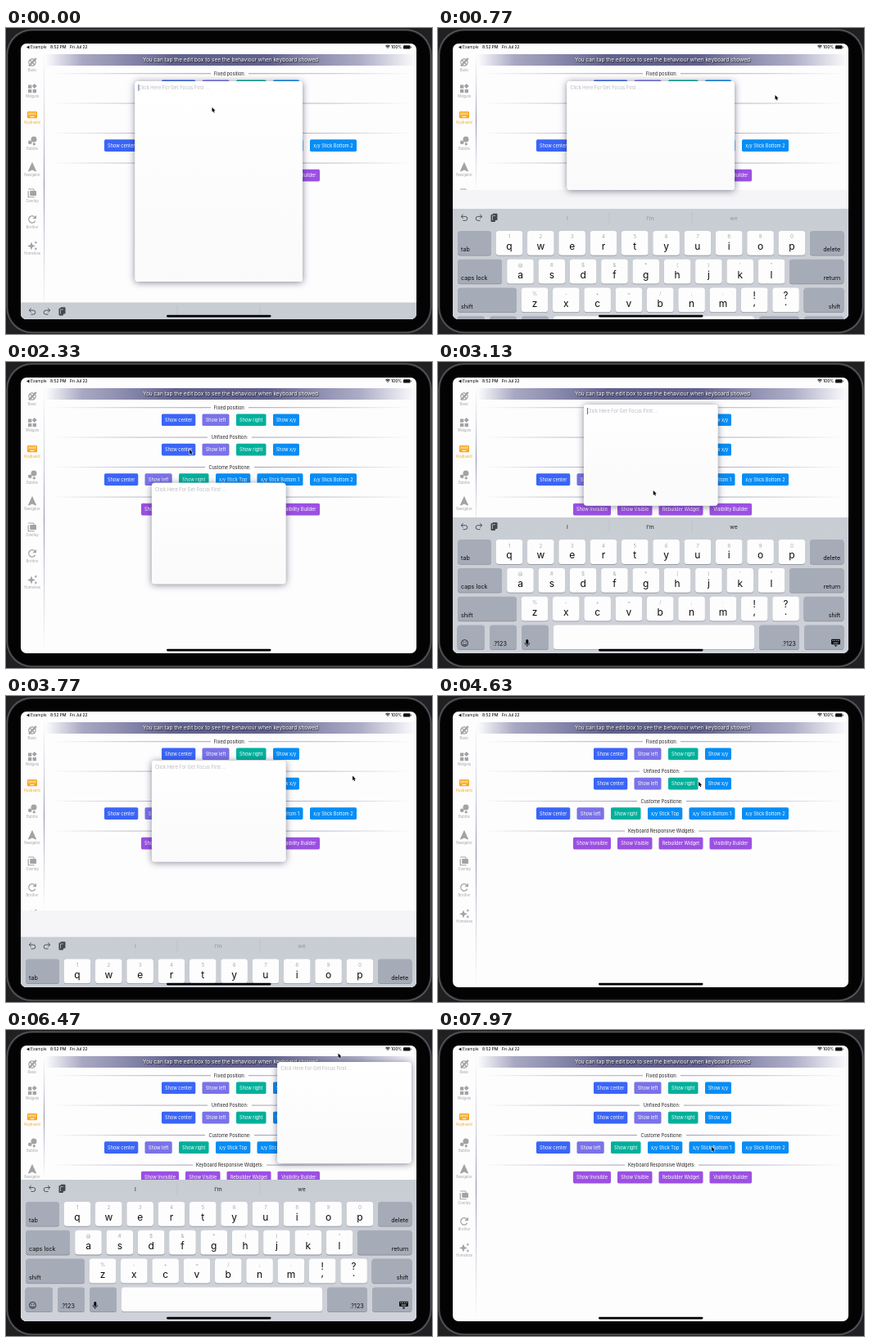
An HTML page with a canvas for the animation above (8 s loop, 520 px wide and 374 px high).

```html
<!DOCTYPE html>
<html lang="en">
<head>
<meta charset="utf-8">
<title>Keyboard popups</title>
<style>
html, body { margin: 0; width: 100%; height: 100%; overflow: hidden; background: #111; }
canvas { display: block; width: 520px; height: 374px; }
</style>
</head>
<body>
<canvas id="stage"></canvas>
<script>
const LOOP = 8000;
const SCREEN = { l: 18, t: 19, r: 501, b: 356 };
const KB_HEIGHT = 173, KB_TIME = 300, LAYOUT_LAG = 36;
const BLUE = '#3a65f6', VIOLET = '#7a72e8', TEAL = '#00b09b', SKY = '#078df5', PURPLE = '#9b50e2';

const canvas = document.getElementById('stage');
const ctx = canvas.getContext('2d');
const dpr = window.devicePixelRatio || 1;
canvas.width = 520 * dpr;
canvas.height = 374 * dpr;

const clamp = v => Math.max(0, Math.min(1, v));
const sine = p => (1 - Math.cos(Math.PI * clamp(p))) / 2;
const mix = (a, b, p) => a + (b - a) * p;

function box(l, t, r, b, radius, fill) {
  ctx.beginPath();
  ctx.roundRect(l, t, r - l, b - t, radius);
  ctx.fillStyle = fill;
  ctx.fill();
}

function text(str, x, y, size, color, align = 'center', weight = 400) {
  ctx.font = `${weight} ${size}px Inter, Roboto, sans-serif`;
  ctx.textAlign = align;
  ctx.textBaseline = 'alphabetic';
  ctx.fillStyle = color;
  ctx.fillText(str, x, y + size * 0.36);
}

function line(points, color, width = 1, close = false) {
  ctx.beginPath();
  points.forEach(([x, y]) => ctx.lineTo(x, y));
  if (close) ctx.closePath();
  ctx.strokeStyle = color;
  ctx.lineWidth = width;
  ctx.stroke();
}

function shape(points, color) {
  ctx.beginPath();
  points.forEach(([x, y]) => ctx.lineTo(x, y));
  ctx.fillStyle = color;
  ctx.fill();
}

function arc(x, y, r, from, to, color, width) {
  ctx.beginPath();
  ctx.arc(x, y, r, from, to);
  ctx.strokeStyle = color;
  ctx.lineWidth = width;
  ctx.stroke();
}

function dot(x, y, r, color) {
  ctx.beginPath();
  ctx.arc(x, y, r, 0, 7);
  ctx.fillStyle = color;
  ctx.fill();
}

function gradient(x0, y0, x1, y1, stops) {
  const g = ctx.createLinearGradient(x0, y0, x1, y1);
  stops.forEach(([at, color]) => g.addColorStop(at, color));
  return g;
}

function clipTo(l, t, r, b, radius, draw) {
  ctx.save();
  ctx.beginPath();
  ctx.roundRect(l, t, r - l, b - t, radius);
  ctx.clip();
  draw();
  ctx.restore();
}

// ---- timeline ----

const kbEvents = [[-66, 1], [678, 0], [2870, 1], [3593, 0], [5529, 1], [6560, 0]];

function keyboard(t) {
  const [start, open] = kbEvents.filter(e => e[0] <= t).pop() || [-66, 1];
  const age = t - start;
  const p = sine(age / KB_TIME);
  const lift = open ? p : 1 - p;
  const hints = open ? clamp((age - 80) / 110) : 1 - 0.7 * clamp(age / 80);
  return { top: SCREEN.b - KB_HEIGHT * lift, lift, open, age, hints };
}

const popups = [
  { from: -1000, to: 1250, cx: 259.7, w: 204.5, h: 245, fixed: true, dx: 0, dy: 300 },
  { from: 2168, to: 4180, cx: 259.7, w: 163.5, h: 123.5, dx: 0, dy: 230 },
  { from: 4950, to: 6990, cx: 413, w: 163.5, h: 123.5, dx: 190, dy: 0 }
];

// time, x, y of the pointer tip
const pointerPath = [
  [0, 251.5, 97], [150, 251.5, 97], [550, 411.5, 82], [1250, 411.5, 82],
  [1950, 224, 107], [2450, 224, 107], [2780, 255, 160], [3080, 255, 160],
  [3450, 423, 97.5], [4200, 423, 97.5], [4780, 299, 106], [5050, 299, 106],
  [5400, 397.5, 140], [5850, 397.5, 140], [6300, 405.5, 28.5], [7000, 405.5, 28.5],
  [7450, 416, 72], [7530, 416, 72], [7930, 334, 142.5], [LOOP, 334, 142.5]
];

function pointerAt(t) {
  const i = Math.max(1, pointerPath.findIndex(k => k[0] >= t));
  const [t0, x0, y0] = pointerPath[i - 1], [t1, x1, y1] = pointerPath[i];
  const p = sine((t - t0) / (t1 - t0));
  return [mix(x0, x1, p), mix(y0, y1, p)];
}

// ---- page ----

function drawDevice() {
  ctx.fillStyle = '#202022';
  ctx.fillRect(0, 0, 520, 374);
  box(0.5, 1.5, 519.5, 373, 31, '#55565b');
  box(2, 3, 518, 371.5, 30, '#1b1b1d');
  box(3, 4, 517, 370.5, 29, '#030303');
  box(SCREEN.l, SCREEN.t, SCREEN.r, SCREEN.b, 7, '#fdfdfe');
}

function drawStatus() {
  shape([[25, 23.5], [28.5, 21.5], [28.5, 25.5]], '#111');
  text('Example', 30, 23.5, 4.9, '#111', 'left');
  text('8:52 PM', 54, 23.5, 4.9, '#111', 'left', 500);
  text('Fri Jul 22', 78, 23.5, 4.9, '#111', 'left', 500);
  for (const r of [1.4, 2.8, 4.2]) arc(466, 25.3, r, -2.3, -0.84, '#111', 0.9);
  text('100%', 483.2, 23.5, 4.9, '#111', 'right', 500);
  box(485, 21.2, 493.5, 25.6, 1.2, '#111');
  box(494, 22.6, 494.8, 24.2, 0.4, '#111');
}

const icons = [
  ['Basic', c => {
    arc(0, 0, 4.2, 0, 7, c, 1.2);
    line([[-4, 4.5], [4.8, -5]], c, 2.4);
    line([[-3, -3], [3, 3]], c, 1.4);
  }],
  ['Widgets', c => {
    box(-5, -4.5, -0.7, -0.2, 0, c);
    box(-5, 1, -0.7, 5.3, 0, c);
    box(0.7, 1, 5, 5.3, 0, c);
    shape([[2.8, -6], [5.8, -3], [2.8, 0], [-0.2, -3]], c);
  }],
  ['Keyboard', c => {
    box(-6, -4, 6, 4.4, 1, c);
    for (let i = 0; i < 5; i++) {
      box(-4.7 + i * 2, -2.4, -3.5 + i * 2, -1.2, 0, '#fff');
      box(-4.7 + i * 2, -0.5, -3.5 + i * 2, 0.7, 0, '#fff');
    }
    box(-2.5, 2, 2.5, 3, 0, '#fff');
  }],
  ['Bubble', c => {
    dot(-2.7, 2, 2.4, c);
    dot(2, -1.8, 3.5, c);
    dot(2.3, 4, 1.6, c);
  }],
  ['Navigator', c => shape([[0, -6], [5, 5], [4.3, 5.6], [0, 3.7], [-4.3, 5.6], [-5, 5]], c)],
  ['Overlay', c => {
    line([[-4.8, -2.5], [-4.8, 5], [2.8, 5]], c, 1.2);
    line([[-4.8, -4.8], [2, -4.8], [2, -2.8]], c, 1);
    box(-2.8, -2.7, 5, 3.2, 0.8, c);
  }],
  ['Brother', c => {
    arc(0, 0.2, 4.2, 0.5, 5.5, c, 1.3);
    shape([[5, -5], [5, -0.4], [0.4, -0.4]], c);
  }],
  ['Homeless', c => {
    const spark = (x, y, r) => shape([[x, y - r], [x + r * .28, y - r * .28], [x + r, y], [x + r * .28, y + r * .28],
      [x, y + r], [x - r * .28, y + r * .28], [x - r, y], [x - r * .28, y - r * .28]], c);
    spark(-1, 0.8, 5);
    spark(4.3, -3.5, 2.1);
    spark(4.3, 4.3, 2.1);
  }]
];

function drawSidebar(bottom) {
  icons.forEach(([name, draw], i) => {
    const y = 42 + i * 31.95;
    const color = name === 'Keyboard' ? '#f8a51b' : '#a3a3a5';
    ctx.save();
    ctx.translate(32, y);
    draw(color);
    ctx.restore();
    text(name, 32, y + 9.5, 4.3, color);
  });
  ctx.fillStyle = gradient(0, 30, 0, bottom,
    [[0, '#77779900'], [0.3, '#77779966'], [0.5, '#666688bb'], [0.7, '#77779966'], [1, '#77779900']]);
  ctx.fillRect(46, 30, 1, bottom - 30);
}

function drawHeader() {
  ctx.fillStyle = gradient(48, 0, 500, 0,
    [[0, '#8080a800'], [0.1, '#8282a8b0'], [0.35, '#61618f'], [0.6, '#61618f'], [0.85, '#8484abaa'], [1, '#8080a800']]);
  ctx.fillRect(48, 32, 452, 14);
  ctx.save();
  ctx.shadowColor = '#000';
  ctx.shadowBlur = 1.5 * dpr;
  ctx.shadowOffsetX = ctx.shadowOffsetY = 0.8 * dpr;
  text('You can tap the edit box to see the behaviour when keyboard showed', 274, 38.8, 6.5, '#fffff0');
  ctx.restore();
}

function drawDivider(label, y, half) {
  const l = 273 - half - 4, r = 273 + half + 4;
  ctx.fillStyle = gradient(54, 0, l, 0, [[0, '#70709000'], [0.5, '#70709077'], [1, '#606080aa']]);
  ctx.fillRect(54, y - 0.4, l - 54, 0.9);
  ctx.fillStyle = gradient(r, 0, 496, 0, [[0, '#606080aa'], [0.5, '#70709077'], [1, '#70709000']]);
  ctx.fillRect(r, y - 0.4, 496 - r, 0.9);
  text(label, 273, y, 5.6, '#222');
}

function drawButton([label, l, r, color], y) {
  box(l, y - 7.3, r, y + 7.3, 1.6, color);
  text(label, (l + r) / 2, y, 5.6, '#fff');
}

const basicRow = [
  ['Show center', 190, 231.3, BLUE], ['Show left', 239.5, 272.5, VIOLET],
  ['Show right', 281, 317.5, TEAL], ['Show x/y', 326, 358, SKY]
];
const sections = [
  ['Fixed position:', 55.7, 19, basicRow],
  ['Unfixed Position:', 92, 23, basicRow],
  ['Custome Positione:', 128.5, 26, [
    ['Show center', 120, 161.3, BLUE], ['Show left', 169.5, 202.7, VIOLET],
    ['Show right', 211, 247.5, TEAL], ['x/y Stick Top', 256, 298.3, SKY],
    ['x/y Stick Bottom 1', 306.5, 362.5, SKY], ['x/y Stick Bottom 2', 371, 428, SKY]]],
  ['Keyboard Responsive Widgets:', 165, 41, [
    ['Show Invisible', 165, 211, PURPLE], ['Show Visible', 219, 261.5, PURPLE],
    ['Rebuilder Widget', 269.5, 323.5, PURPLE], ['Visibility Builder', 331.5, 383, PURPLE]]]
];

function drawContent(bottom) {
  drawStatus();
  drawSidebar(bottom);
  drawHeader();
  for (const [label, y, half, row] of sections) {
    drawDivider(label, y, half);
    row.forEach(b => drawButton(b, y + 15.1));
  }
}

function drawPopup(t, pop, bottom, kb) {
  if (t < pop.from || t > pop.to + 260) return;
  const enter = (1 - clamp((t - pop.from) / 300)) ** 3;
  const leave = clamp((t - pop.to) / 250) ** 2;
  const away = Math.max(enter, leave);
  const l = pop.cx - pop.w / 2 + pop.dx * away;
  const rest = pop.fixed ? 65 : (SCREEN.t + bottom - pop.h) / 2;
  const h = pop.fixed ? Math.min(pop.h, bottom - 65) : pop.h;
  const y = rest + pop.dy * away;
  ctx.save();
  ctx.shadowColor = 'rgba(30,30,60,.55)';
  ctx.shadowBlur = 9 * dpr;
  ctx.shadowOffsetY = dpr;
  box(l, y, l + pop.w, y + h, 3.5, '#fff');
  ctx.restore();
  box(l, y, l + pop.w, y + h, 3.5, gradient(0, y, 0, y + h, [[0, '#fff'], [1, '#fafafb']]));
  text('Click Here For Get Focus First ...', l + 4, y + 7.8, 5.7, '#b9b9bc', 'left');
  if (kb.open && kb.age % 1000 < 500) box(l + 4, y + 4, l + 4.9, y + 12, 0, '#4a5a92');
}

// ---- on-screen keyboard ----

const INK = '#0b0b0c', GREY_KEY = '#a6acb7', STEP = 38.32;
const letterRows = [
  ['qwertyuiop', '1234567890', 87],
  ['asdfghjkl', '@#$&*()\'"', 100.5],
  ['zxcvbnm,.', '%-+=/;:!?', 118]
];
const wideKeys = [
  [0, 24, 65, 'tab', 'left'], [0, 454, 495.5, 'delete', 'right'],
  [1, 24, 78, 'caps lock', 'left'], [1, 429, 495.5, 'return', 'right'],
  [2, 24, 96, 'shift', 'left'], [2, 446.5, 495.5, 'shift', 'right'],
  [3, 23.5, 57, '', 'left'], [3, 63, 96, '.?123', 'left'], [3, 102, 135, '', 'left'],
  [3, 392, 441, '.?123', 'right'], [3, 447, 495.5, '', 'left']
];

const rowTop = row => 27 + row * 34.8;

function key(l, r, row, fill) {
  const y = rowTop(row);
  box(l, y + 0.9, r, y + 30.6, 3.5, '#8b8e95');
  box(l, y, r, y + 29.8, 3.5, fill);
}

function drawToolbar(hints) {
  const c = '#45474c';
  for (const [x, dir] of [[32, 1], [50, -1]]) {
    ctx.save();
    ctx.translate(x, 11);
    ctx.scale(dir, 1);
    line([[-1.2, -4], [-3.8, -1.5], [-1.2, 1]], c, 0.9);
    line([[-3.8, -1.5], [1.3, -1.5]], c, 0.9);
    arc(1.3, 1, 2.5, -1.57, 1.57, c, 0.9);
    line([[1.3, 3.5], [-1.5, 3.5]], c, 0.9);
    ctx.restore();
  }
  box(64.5, 7, 70, 16, 1, c);
  box(66.5, 5.8, 72.5, 14, 1, c);
  line([[66.5, 14], [66.5, 8.5], [70, 8.5]], '#cfd2d9', 0.7);
  box(208.7, 3.5, 209.3, 18.5, 0, '#b5b8c0');
  box(309.7, 3.5, 310.3, 18.5, 0, '#b5b8c0');
  ctx.globalAlpha = hints;
  text('I', 158, 11.3, 6.8, '#222');
  text('I\u2019m', 259, 11.3, 6.8, '#222');
  text('we', 361, 11.3, 6.8, '#222');
  ctx.globalAlpha = 1;
}

function drawKeyIcons() {
  const y = rowTop(3) + 22;
  arc(32.5, y, 4, 0, 7, INK, 0.8);
  arc(32.5, y + 0.4, 2, 0.2, 2.94, INK, 0.8);
  dot(31.1, y - 1.2, 0.6, INK);
  dot(33.9, y - 1.2, 0.6, INK);
  box(107.3, y - 4.5, 110.3, y + 1.3, 1.5, INK);
  arc(108.8, y - 0.3, 2.9, 0, Math.PI, INK, 0.7);
  line([[108.8, y + 2.6], [108.8, y + 4.5]], INK, 0.8);
  box(480, y - 4.7, 491, y + 1.7, 1, INK);
  for (let i = 0; i < 4; i++) {
    box(481.2 + i * 2.4, y - 3.6, 482.6 + i * 2.4, y - 2.4, 0, GREY_KEY);
  }
  box(482.5, y - 0.8, 488.5, y + 0.3, 0, GREY_KEY);
  shape([[483.5, y + 2.7], [487.5, y + 2.7], [485.5, y + 4.5]], INK);
}

function drawKeyboard(kb) {
  if (kb.lift <= 0) return;
  ctx.save();
  ctx.translate(0, kb.top);
  box(SCREEN.l, 0, SCREEN.r, KB_HEIGHT, 0, gradient(0, 0, 0, KB_HEIGHT, [[0, '#c8ccd3'], [1, '#cfd2d9']]));
  drawToolbar(kb.hints);
  letterRows.forEach(([letters, alts, first], row) => {
    const y = rowTop(row);
    [...letters].forEach((ch, i) => {
      const x = first + i * STEP;
      const mark = ',.'.includes(ch);
      key(x - 16.3, x + 16.3, row, '#fdfdfe');
      text(alts[i], x, y + (mark ? 9 : 7.2), mark ? 11.5 : 6.3, mark ? INK : '#a9abb0');
      text(ch, x, y + (mark ? 17.5 : 18.8), 12, INK);
    });
  });
  for (const [row, l, r, label, side] of wideKeys) {
    key(l, r, row, GREY_KEY);
    text(label, side === 'left' ? l + 4 : r - 4.3, rowTop(row) + 22.6, 7.2, INK, side);
  }
  key(141, 386, 3, '#fdfdfe');
  drawKeyIcons();
  ctx.restore();
}

function drawPointer([x, y]) {
  ctx.save();
  ctx.translate(x, y);
  const arrow = [[0, 0], [0, 5.6], [1.3, 4.5], [2.2, 6.5], [3.2, 6], [2.3, 4.1], [4, 4]];
  ctx.lineJoin = 'round';
  line(arrow, '#ffffffcc', 1.1, true);
  shape(arrow, '#000');
  ctx.restore();
}

function draw(t) {
  const kb = keyboard(t);
  const bottom = keyboard(t - LAYOUT_LAG).top;
  ctx.setTransform(dpr, 0, 0, dpr, 0, 0);
  drawDevice();
  clipTo(SCREEN.l, SCREEN.t, SCREEN.r, SCREEN.b, 7, () => {
    if (bottom < SCREEN.b) box(SCREEN.l, bottom, SCREEN.r, SCREEN.b, 0, '#f5f5f7');
    clipTo(SCREEN.l, SCREEN.t, SCREEN.r, bottom, 0, () => drawContent(bottom));
    popups.forEach(p => drawPopup(t, p, bottom, kb));
    drawKeyboard(kb);
    box(196, 350.8, 323.5, 353.4, 1.3, '#000');
  });
  drawPointer(pointerAt(t));
}

const start = performance.now();
function frame() {
  draw((performance.now() - start) % LOOP);
  requestAnimationFrame(frame);
}
frame();
</script>
</body>
</html>
```
